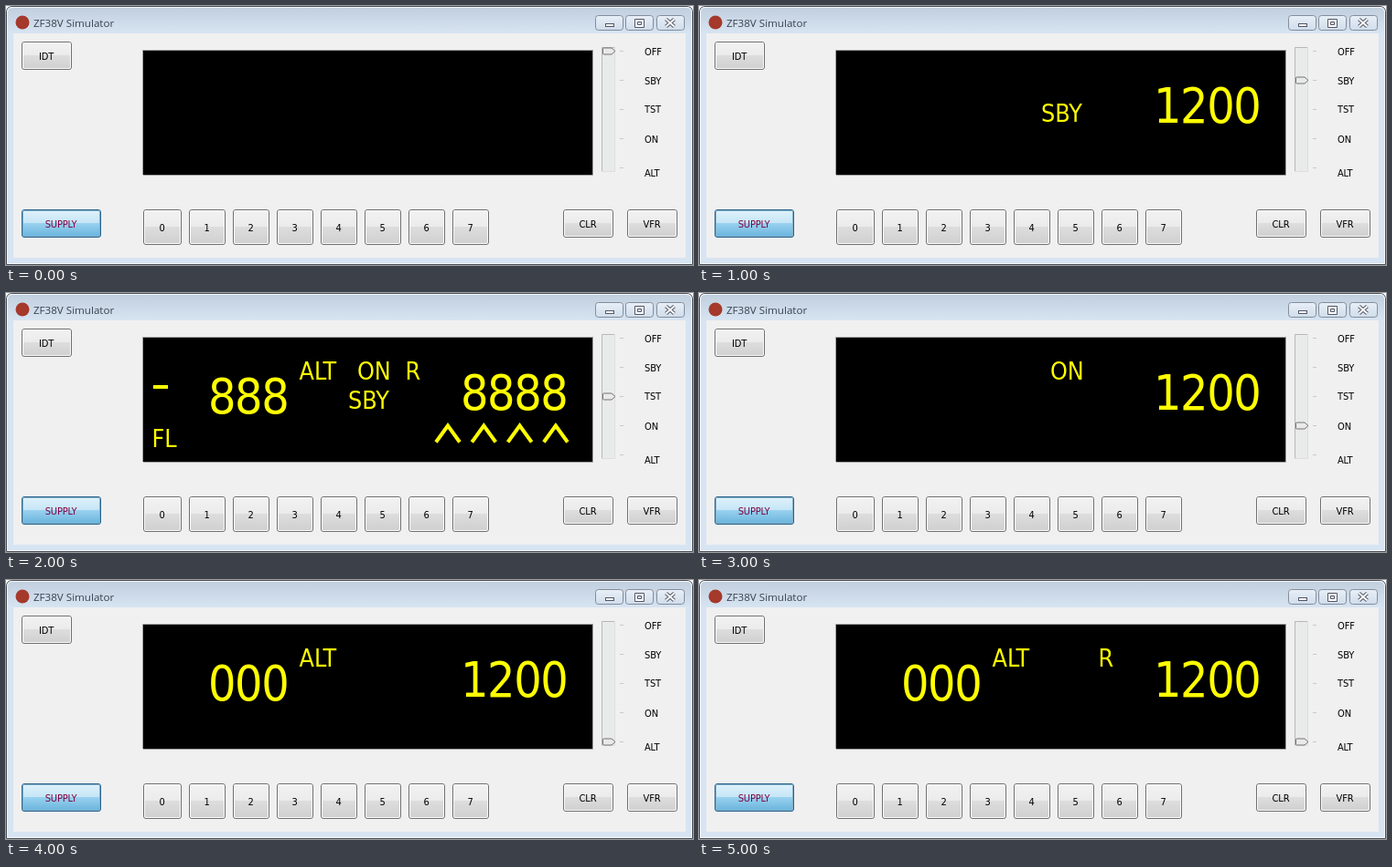
Recreate the animation shown at these times as an HTML page. Size 751 px wide and 284 px high, loop 6 s.

```html
<!DOCTYPE html>
<html lang="en">
<head>
<meta charset="utf-8">
<title>ZF38V Simulator</title>
<style>
  html, body { margin: 0; width: 100%; height: 100%; overflow: hidden; background: #fff; }
  svg { display: block; width: 751px; height: 284px; }
  text { font-family: "DejaVu Sans Condensed", "Noto Sans", sans-serif; font-size: 11px; letter-spacing: -.15px; }
  .caption { font-family: "Open Sans", "Noto Sans", sans-serif; font-size: 11.6px; letter-spacing: 0; fill: #384250; }
  .button text { text-anchor: middle; }
  #display text { fill: #ff0; font-size: 26.67px; letter-spacing: 0; }
  #display .digits { font-size: 53.33px; letter-spacing: -1.4px; }
  #display path { fill: none; stroke: #ff0; stroke-width: 4; }
</style>
</head>
<body>
<svg id="stage" viewBox="0 0 751 284">
  <defs>
    <linearGradient id="titlebar" x2="0" y2="1">
      <stop stop-color="#c1cfde"/><stop offset="1" stop-color="#d7e4f2"/>
    </linearGradient>
    <linearGradient id="plain" x2="0" y2="1">
      <stop stop-color="#f2f2f2"/><stop offset=".5" stop-color="#ebebeb"/>
      <stop offset=".5" stop-color="#ddd"/><stop offset="1" stop-color="#cfcfcf"/>
    </linearGradient>
    <linearGradient id="pressed" x2="0" y2="1">
      <stop stop-color="#e0f2fb"/><stop offset=".5" stop-color="#c4e5f6"/>
      <stop offset=".5" stop-color="#98d1ef"/><stop offset="1" stop-color="#68b3db"/>
    </linearGradient>
    <linearGradient id="control" x2="0" y2="1">
      <stop stop-color="#e8eff7"/><stop offset="1" stop-color="#d0ddeb"/>
    </linearGradient>
  </defs>

  <!-- window frame -->
  <path d="M.5 283.5V7Q.5 .5 7 .5H744Q750.5 .5 750.5 7V283.5Z" fill="#d7e4f2" stroke="#4b4f54"/>
  <path d="M2 30V7Q2 2 7 2H744Q749 2 749 7V30Z" fill="url(#titlebar)"/>
  <path d="M1.5 282.5V7Q1.5 1.5 7 1.5H744Q749.5 1.5 749.5 7V282.5Z" fill="none" stroke="#f3f8fc"/>
  <rect x="8" y="30" width="735" height="246" fill="#f0f0f0"/>
  <circle cx="18" cy="18" r="7.5" fill="#a5392b"/>
  <text class="caption" x="30" y="23">ZF38V Simulator</text>
  <g id="controls" stroke="#535666">
    <rect x="655.5" y="19.5" width="9" height="3" fill="#fff"/>
    <path d="M687.5 14.5H697.5V23.5H687.5ZM690.5 17.5V20.5H694.5V17.5Z" fill="#fff" fill-rule="evenodd"/>
    <path d="M721.5 14.5L730.5 22.5M730.5 14.5L721.5 22.5" stroke-width="4"/>
    <path d="M721.5 14.5L730.5 22.5M730.5 14.5L721.5 22.5" stroke="#fff" stroke-width="2"/>
  </g>

  <!-- display and mode slider -->
  <rect x="150" y="49" width="492" height="137" fill="#fff"/>
  <path d="M150 49H641V185H150Z" stroke="none"/>
  <path d="M150 185.5H641.5V49M149.5 185V48.5H642" fill="none" stroke="#a0a0a0"/>
  <g id="display"></g>
  <rect x="651.5" y="45.5" width="14" height="136" fill="#e9eaea" stroke="#dedede"/>
  <path d="M651.5 181V45.5H665" fill="none" stroke="#b8b8b8"/>
  <g id="scale"></g>
  <path id="thumb" d="M653.5 -3.5H662L666 0L662 3.5H653.5Q652.5 3.5 652.5 2.5V-2.5Q652.5 -3.5 653.5 -3.5Z" fill="#e9e9e9" stroke="#747474"/>
  <g id="buttons"></g>
</svg>
<script>
const byId = id => document.getElementById(id);

function add(parent, tag, attributes, content = "") {
  const node = document.createElementNS("http://www.w3.org/2000/svg", tag);
  for (const [key, value] of Object.entries(attributes)) node.setAttribute(key, value);
  node.textContent = content;
  return parent.appendChild(node);
}

function addButton(label, x, y, width, height, pressed = false) {
  const group = add(byId("buttons"), "g", { class: "button" });
  add(group, "rect", { x: x + .5, y: y + .5, width: width - 1, height: height - 1, rx: 2.5,
    fill: `url(#${pressed ? "pressed" : "plain"})`, stroke: pressed ? "#2c628b" : "#707070" });
  add(group, "rect", { x: x + 1.5, y: y + 1.5, width: width - 3, height: height - 3, rx: 1.5,
    fill: "none", stroke: pressed ? "#7eaec8" : "#fafafa" });
  add(group, "text", { x: x + width / 2 - .5, y: y + Math.floor(height / 2) + 5,
    fill: pressed ? "#800040" : "#000" }, label);
}

addButton("IDT", 17, 39, 55, 31);
addButton("SUPPLY", 17, 223, 87, 31, true);
for (let digit = 0; digit < 8; digit++)
  addButton(digit, digit ? 152 + digit * 48 : 150, 223, digit ? 40 : 42, 39);
addButton("CLR", 609, 223, 55, 31);
addButton("VFR", 679, 223, 55, 31);

for (const [x, width] of [[644, 30], [677, 30], [711, 30]])
  byId("controls").prepend(add(byId("controls"), "rect", { x: x + .5, y: 10.5, width, height: 16, rx: 3,
    fill: "url(#control)", stroke: "#848d9b" }));

const notchY = notch => 49 + notch * 32;
[["OFF", 54], ["SBY", 86], ["TST", 117], ["ON", 150], ["ALT", 187]].forEach(([label, y], notch) => {
  add(byId("scale"), "text", { x: 698, y }, label);
  add(byId("scale"), "path", { d: `M671 ${notchY(notch) + .5}h4`, stroke: "#c9c9c9" });
});

const display = byId("display");
const addText = (label, x, y, style = "") => add(display, "text", { x, y, class: style }, label);
const parts = {
  code: addText("1200", 497, 128, "digits"),
  level: addText("000", 221, 132, "digits"),
  alt: addText("ALT", 320.5, 95),
  on: addText("ON", 384, 95),
  reply: addText("R", 436.5, 95),
  standby: addText("SBY", 374, 127),
  flight: addText("FL", 159.5, 169),
  minus: add(display, "path", { d: "M161 103h16" }),
  carets: add(display, "path", { d: [0, 1, 2, 3].map(i => `M${470 + i * 39.3} 163.5l13 -18l13 18`).join("") })
};

// Each one-second step: slider notch and the lit parts of the display.
const steps = [
  { notch: 0, lit: {} },
  { notch: 1, lit: { code: "1200", standby: "SBY" } },
  { notch: 2, lit: { code: "8888", level: "888", alt: "ALT", on: "ON", reply: "R",
    standby: "SBY", flight: "FL", minus: "", carets: "" } },
  { notch: 3, lit: { code: "1200", on: "ON" } },
  { notch: 4, lit: { code: "1200", level: "000", alt: "ALT" } },
  { notch: 4, lit: { code: "1200", level: "000", alt: "ALT", reply: "R" } }
];

function draw() {
  const { notch, lit } = steps[Math.floor(performance.now() / 1000) % steps.length];
  byId("thumb").setAttribute("transform", `translate(0 ${notchY(notch) + .5})`);
  for (const [name, node] of Object.entries(parts)) {
    node.style.display = name in lit ? "" : "none";
    node.textContent = lit[name] || "";
  }
  requestAnimationFrame(draw);
}
draw();
</script>
</body>
</html>
```
